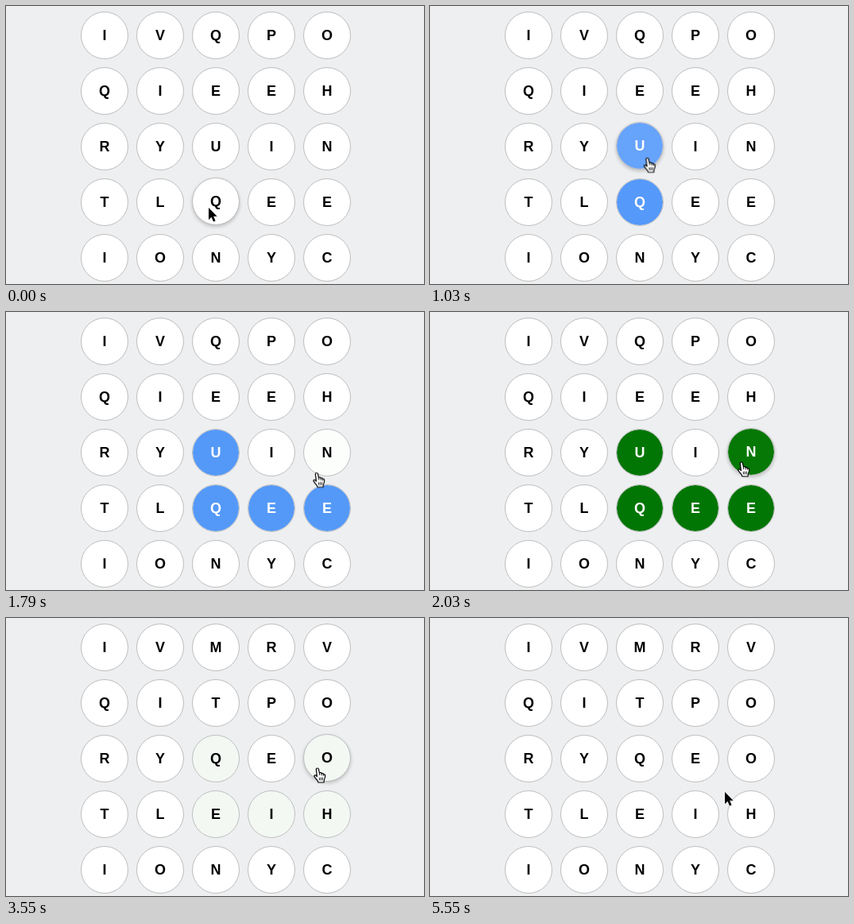
Animation of 526x350 px, one loop 5.58 s. Source, as an HTML page:

```html
<!DOCTYPE html>
<html lang="en">
<head>
<meta charset="utf-8">
<title>Letter grid</title>
<style>
  html, body { margin: 0; width: 100%; height: 100%; overflow: hidden; background: #eeeff1; }
  #board { position: absolute; left: 0; top: 0; width: 526px; height: 350px; overflow: hidden; }
  .cell {
    position: absolute; box-sizing: border-box; width: 60px; height: 60px;
    border: 1px solid #bfbfc0; border-radius: 50%; background: #fff padding-box;
    font: bold 18px/58px "Liberation Sans", Arial, sans-serif; color: #000; text-align: center;
  }
  .cell span { position: absolute; inset: 0; }
  svg { position: absolute; left: 0; top: 0; overflow: visible; }
</style>
</head>
<body>
<div id="board">
  <svg id="cursor" width="20" height="24">
    <g id="arrow">
      <path d="M0 0V15L3.5 11.8 6 17.4 8.5 16.3 6.1 10.8H10.6Z" transform="translate(.6 1)" opacity=".18"/>
      <path d="M0 0V15L3.5 11.8 6 17.4 8.5 16.3 6.1 10.8H10.6Z" stroke="#fff" stroke-width="1.1" paint-order="stroke"/>
    </g>
    <g id="hand" stroke="#000" stroke-linejoin="round" stroke-linecap="round">
      <path d="M-1.7 1.6Q-1.6 0-.2 0 1.2 0 1.5 1.6L2.4 6Q4.6 5 5.2 6.8 7 6 7.6 7.8 9.6 7.4 9.6 9.6 9.8 12.5 8.4 14.5L8 18H1Q.3 15.5-1.6 13.8-3.6 11.5-4.2 10-4 8.4-2.2 9L-.6 10.6Z" fill="#fff" stroke-width="1.2"/>
      <path d="M2.4 6L2.8 8.6M5.2 6.8L5.4 9M7.6 7.8V9.4M2.2 12.2L2.6 15M4.4 12V15M6.5 12L6.4 15" fill="none" stroke-width=".9"/>
    </g>
  </svg>
</div>
<script>
const LOOP = 5580, PRESS = 480, SWAP = 3345;
const PITCH = 70, RADIUS = 30;
const WHITE = '#fff', BLUE = '#5599fa', GREEN = '#007500';
const FLAT = '0 0 0 rgba(0,0,0,0)', RAISED = '0 2px 4px rgba(0,0,0,.2)';
const DOWN = 'translateY(0px)', UP = 'translateY(-1px)';
const before = ['IVQPO', 'QIEEH', 'RYUIN', 'TLQEE', 'IONYC'];
const after = ['IVMRV', 'QITPO', 'RYQEO', 'TLEIH', 'IONYC'];

// Pointer tip: ms, x, y.
const path = [
  [0, 255, 254], [PRESS, 255, 254], [670, 255, 230], [1000, 268, 186],
  [1360, 333, 248], [1600, 388, 246], [1850, 392, 189],
  [3600, 392, 189], [4240, 373, 215], [4550, 371, 219], [LOOP, 371, 219],
];

const board = document.getElementById('board');
const cursor = document.getElementById('cursor');
const start = document.timeline.currentTime ?? 0;

function run(el, frames) {
  const anim = el.animate(frames, { duration: LOOP, iterations: Infinity });
  anim.startTime = start;
}

// Each step [ms, value] starts an eased change; a later step cuts it short.
function change(el, prop, dur, value, steps) {
  const frames = [{ offset: 0, [prop]: value }];
  steps.forEach(([t, next], i) => {
    const stop = Math.min(t + dur, steps[i + 1]?.[0] ?? LOOP);
    frames.push({ offset: t / LOOP, [prop]: value, easing: 'ease' });
    frames.push({ offset: stop / LOOP, [prop]: next });
    value = next;
  });
  run(el, [...frames, { offset: 1, [prop]: value }]);
}

function tipAt(t) {
  const i = path.findIndex(p => p[0] > t);
  const [t0, x0, y0] = path[i - 1], [t1, x1, y1] = path[i];
  const k = (t - t0) / (t1 - t0);
  return [x0 + (x1 - x0) * k, y0 + (y1 - y0) * k];
}

function label(cell, text) {
  const span = document.createElement('span');
  span.textContent = text;
  cell.append(span);
  return span;
}

function makeCell(letter, r, c) {
  const x = 124 + PITCH * c, y = 37 + PITCH * r;
  const el = document.createElement('div');
  el.className = 'cell';
  el.style.left = x - RADIUS + 'px';
  el.style.top = y - RADIUS + 'px';
  board.insertBefore(el, cursor);
  const text = label(el, letter);
  if (after[r][c] !== letter) {
    change(text, 'opacity', 0, 1, [[SWAP, 0]]);
    change(label(el, after[r][c]), 'opacity', 0, 0, [[SWAP, 1]]);
  }
  return { el, text, x, y, enter: null, leave: null };
}

const cells = before.flatMap((row, r) => [...row].map((letter, c) => makeCell(letter, r, c)));

// Follow the pointer to learn when it enters and leaves each letter.
for (let t = 0; t < LOOP; t += 5) {
  const [px, py] = tipAt(t);
  for (const cell of cells) {
    if (Math.hypot(px - cell.x, py - cell.y) < RADIUS) {
      cell.enter ??= t;
      cell.leave = t + 5;
    }
  }
}

const picked = cells.filter(cell => cell.enter !== null).sort((a, b) => a.enter - b.enter);
const solved = picked.at(-1).enter;
const hand = [];

for (const { el, text, enter, leave } of picked) {
  const pick = Math.max(enter, PRESS);
  const fills = pick < solved ? [[pick, BLUE]] : [];
  change(el, 'backgroundColor', 300, WHITE, [...fills, [solved, GREEN], [SWAP - 12, WHITE]]);
  change(text, 'color', 200, '#000', [[pick, WHITE]]);

  const hover = (prop, rest, lifted) => enter
    ? change(el, prop, 120, rest, [[enter, lifted], [leave, rest]])
    : change(el, prop, 120, lifted, [[PRESS, rest]]);
  hover('transform', DOWN, UP);
  hover('boxShadow', FLAT, RAISED);
  if (enter) hand.push([enter, 1], [leave, 0]);
}

run(cursor, path.map(([t, x, y]) => ({ offset: t / LOOP, transform: `translate(${x}px, ${y}px)` })));
change(document.getElementById('hand'), 'opacity', 0, 0, hand);
change(document.getElementById('arrow'), 'opacity', 0, 1, hand.map(([t, on]) => [t, 1 - on]));
</script>
</body>
</html>
```
